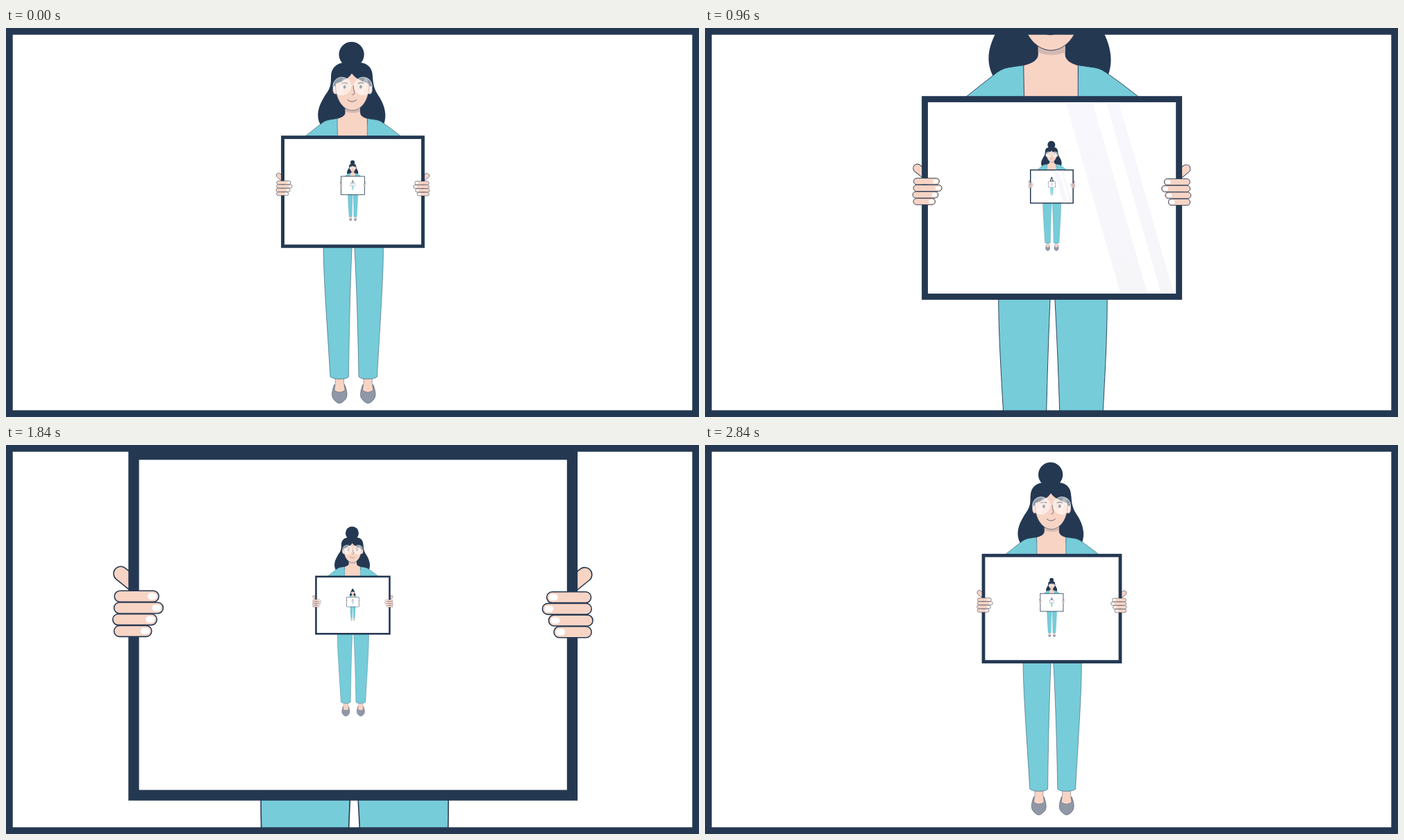
An HTML page with a canvas that plays this animation: 998x561 px, repeating every 2880 ms.

```html
<!DOCTYPE html>
<html lang="en">
<head>
<meta charset="utf-8">
<title>Endless picture</title>
<style>
  html, body { margin: 0; width: 100%; height: 100%; overflow: hidden; background: #fff; }
  canvas { display: block; }
</style>
</head>
<body>
<canvas id="stage" width="998" height="561"></canvas>
<script>
const ctx = document.getElementById('stage').getContext('2d');
const NAVY = '#243852', TEAL = '#76ccd9', SKIN = '#f8d4c5', GREY = '#9098a8', WHITE = '#fff';
const LOOP = 2880, STEP = 40;
const NEST = 5.96;                       // size ratio between one figure and the next
const CENTER = { x: 499.4, y: 225.3 };   // the point the zoom closes in on
const LINE = 0.5;
const BOARD = { x: 396.1, y: 155.2, w: 206.8, h: 162, edge: 4.9 };

function shape(d, fill, stroke, width = LINE) {
  const path = new Path2D(d);
  if (fill) { ctx.fillStyle = fill; ctx.fill(path); }
  if (stroke) { ctx.strokeStyle = stroke; ctx.lineWidth = width; ctx.stroke(path); }
}

function ellipse(x, y, rx, ry, fill, stroke, width = LINE) {
  ctx.beginPath();
  ctx.ellipse(x, y, rx, ry, 0, 0, 7);
  if (fill) { ctx.fillStyle = fill; ctx.fill(); }
  if (stroke) { ctx.strokeStyle = stroke; ctx.lineWidth = width; ctx.stroke(); }
}

function pill(x, y, w, h, r, fill, stroke) {
  ctx.beginPath();
  ctx.roundRect(x, y, w, h, r);
  ctx.fillStyle = fill;
  ctx.fill();
  if (stroke) { ctx.strokeStyle = stroke; ctx.lineWidth = LINE; ctx.stroke(); }
}

// Draws a part, then its mirror image, optionally lowered by dy.
function pair(axis, draw, dy = 0) {
  draw();
  ctx.save();
  ctx.translate(2 * axis, dy);
  ctx.scale(-1, 1);
  draw();
  ctx.restore();
}

function legs() {
  pair(500.8, () => {
    shape('M472.8 514.5C470 521 468.8 529 470.2 532.5C472 537 477 541.2 480.3 541.2C483.5 541.2 489 536.5 490.5 532.5C491.8 528 490.5 521 487.8 514.5Z', GREY, NAVY);
    shape('M474.5 504L474.3 512L472.8 522.5Q480.3 528 488.2 522.5L486.6 512L486.5 504Z', SKIN, NAVY, 0.4);
  });
  shape('M457.1 312V317C457.3 360 462 420 467 503Q471 506.2 480 506.2Q490 506.6 493.5 503C494.3 430 496 365 498.1 317V312Z', TEAL, NAVY);
  shape('M501.9 312V317C504.5 365 506.8 430 508 503Q511.5 506.6 521.5 506.2Q530.5 506.2 534.5 503C539 420 543.5 360 543.4 317V312Z', TEAL, NAVY);
}

function torso() {
  shape('M468 70C468.5 88 463 91 457.4 100.7C450 113 446 126 452.5 139H544C549 126 545.5 113 538.5 100.7C532 91 529 86 528 70Z', NAVY);
  shape('M488.6 112V122Q488.6 128 477 131V160H520.3V131Q510 128 510 122V112Z', SKIN);
  shape('M426 160L431.9 155.3L452.5 139Q459 133.3 465 132.4L477 130.6L477.5 160Z', TEAL, NAVY);
  shape('M573 160L567.7 155.3Q554 144.5 546 139Q539 133.3 534 132.6L520.3 130.6V160Z', TEAL, NAVY);
  shape('M488.6 115H510V120.5Q499 124.5 488.6 120.5Z', '#d3b9b1');
}

function head() {
  ellipse(497.6, 38.2, 18.1, 18.3, NAVY);
  pair(499.1, () => ellipse(474.4, 89, 4, 6.6, SKIN, NAVY));
  shape('M474.5 62V82C474.5 105 486.5 118.8 498.8 118.8C511 118.8 523 105 523 82V62Z', SKIN, NAVY);
  shape('M498 65.5C494.5 72 485 77 475.5 80L474 84L468 84V70C468 57 477 50 488 50H509C520 50 528 57 528 70V84L523.5 84L522 80C512 77 502 72 498 65.5Z', NAVY);
  pair(499.3, () => {
    ellipse(487.4, 84.9, 2, 2.7, NAVY);
    shape('M483 80.2Q487 77.8 491.6 80', null, NAVY, 1.6);
  });
  shape('M500 82Q500.2 88 501.8 93.5Q502 96.3 498.3 96.3', null, NAVY, 0.6);
  shape('M491.7 103.4Q498.2 109.3 505 103.4', null, NAVY, 0.7);
  pair(499.1, () => ellipse(483.7, 83.7, 12.8, 12.8, 'rgba(255,255,255,.5)', 'rgba(255,255,255,.85)', 0.8));
  for (const x of [483.7, 514.4]) {
    shape(`M${x + 2} 72L${x + 8} 74L${x - 1} 96H${x - 7}Z`, 'rgba(255,255,255,.3)');
  }
  shape('M496.4 83Q499 80.8 501.6 83', null, WHITE, 0.8);
}

function thumb() {
  ctx.lineCap = 'round';
  shape('M392.6 212.6L401 219.4', null, NAVY, 7.1);
  shape('M392.6 212.6L401 219.4', null, SKIN, 6.1);
  ctx.lineCap = 'butt';
}

function fingers() {
  const spans = [[389.7, 410.1], [389.5, 412.1], [388.9, 409.2], [389.5, 406.8]];
  spans.forEach(([left, right], i) => {
    const y = 220.5 + i * 5.34;
    pill(left, y, right - left, 5.1, 2.5, SKIN, NAVY);
    pill(right - 5.1, y + 1.05, 4.1, 3, 1.4, WHITE);
  });
}

// A pair of slanted reflections crosses the glass once per loop.
function gleam(time) {
  const progress = (time - 340) / 900;
  if (progress <= 0 || progress >= 1) return;
  const { x, y, w, h, edge } = BOARD;
  const top = y + edge, bottom = y + h - edge;
  const slant = 43.7, total = 85;
  const start = x + edge - total + progress * (w - 2 * edge + total);
  ctx.save();
  ctx.beginPath();
  ctx.rect(x + edge, top, w - 2 * edge, h - 2 * edge);
  ctx.clip();
  const tint = ctx.createLinearGradient(0, top, 0, bottom);
  tint.addColorStop(0, '#f8f7fd');
  tint.addColorStop(1, '#f6f6f9');
  for (const [offset, width] of [[0, 21.5], [32.3, 10.1]]) {
    const left = start + offset;
    shape(`M${left} ${top}h${width}L${left + slant + width} ${bottom}h${-width}Z`, tint);
  }
  ctx.restore();
}

function board(time) {
  const { x, y, w, h, edge } = BOARD;
  ctx.fillStyle = NAVY;
  ctx.fillRect(x, y, w, h);
  ctx.fillStyle = WHITE;
  ctx.fillRect(x + edge, y + edge, w - 2 * edge, h - 2 * edge);
  gleam(time);
}

function figure(scale, time) {
  ctx.save();
  ctx.translate(CENTER.x, CENTER.y);
  ctx.scale(scale, scale);
  ctx.translate(-CENTER.x, -CENTER.y);
  legs();
  torso();
  head();
  pair(CENTER.x, thumb, 0.45);
  board(time);
  pair(CENTER.x, fingers, 0.45);
  ctx.restore();
}

function render() {
  const time = Math.floor(performance.now() % LOOP / STEP) * STEP;
  ctx.fillStyle = WHITE;
  ctx.fillRect(0, 0, 998, 561);
  for (let depth = 0; depth < 4; depth++) {
    figure(NEST ** (time / LOOP - depth), time);
  }
  ctx.strokeStyle = NAVY;
  ctx.lineWidth = 9.7;
  ctx.strokeRect(4.85, 4.85, 988.3, 551.3);
  requestAnimationFrame(render);
}
render();
</script>
</body>
</html>
```
